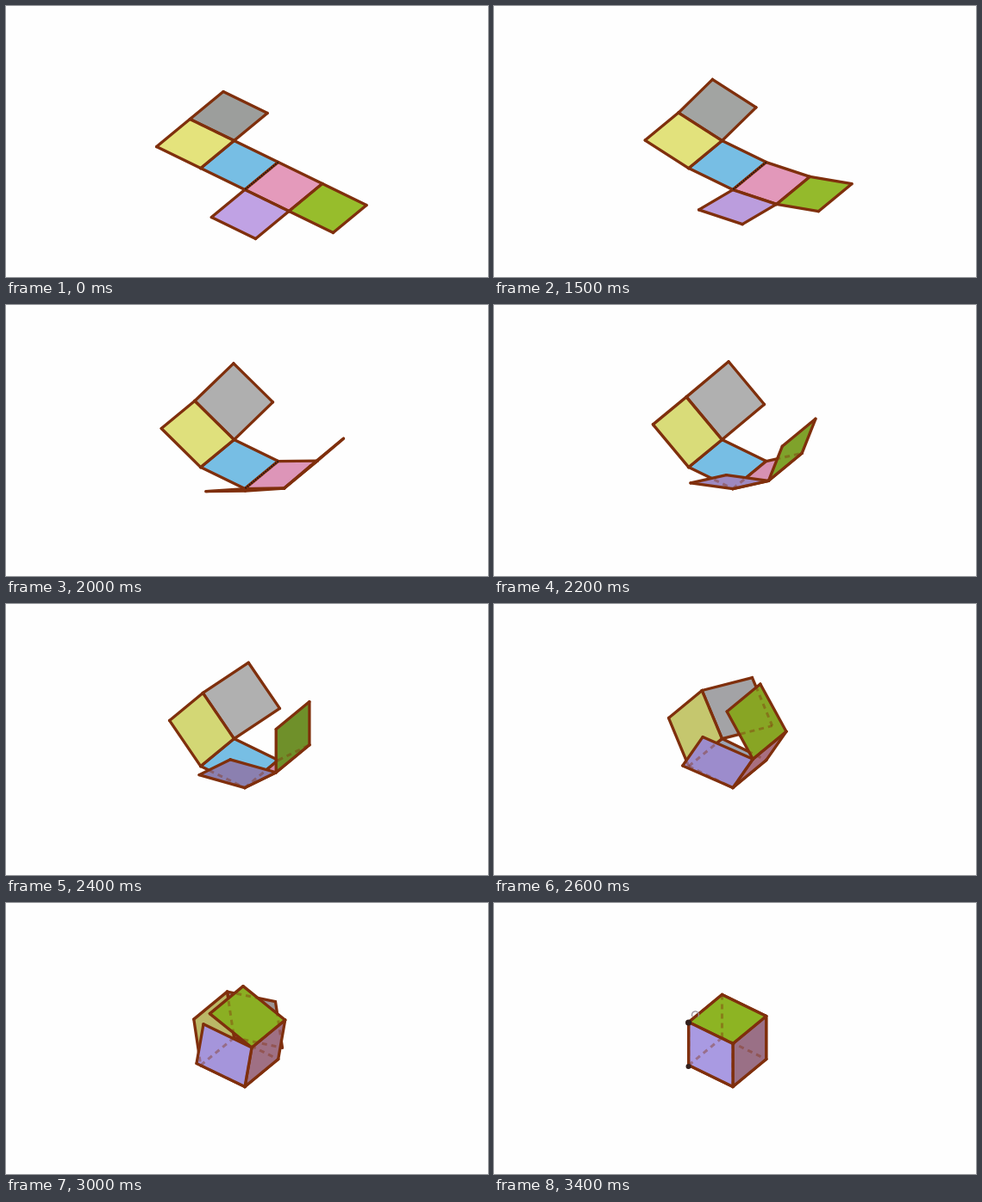
An HTML page with a canvas for the animation above (4900 ms loop, 559 by 315 pixels).

```html
<!DOCTYPE html>
<html lang="en">
<head>
<meta charset="utf-8">
<title>Folding a cube net</title>
<style>
  html, body { margin: 0; width: 100%; height: 100%; overflow: hidden; background: #fefefe; }
  canvas { display: block; }
</style>
</head>
<body>
<canvas id="stage" width="559" height="315"></canvas>
<script>
const ctx = document.getElementById('stage').getContext('2d');
const LOOP = 4900;
// Each step folds every hinge by another 9 degrees.
const STEP_TIMES = [0, 1500, 1700, 2000, 2200, 2400, 2500, 2600, 2800, 3000, 3400];
const LAST = STEP_TIMES.length - 1;
const BROWN = '#7f2f0c';

// Projected unit axes of the base square.
const ORIGIN = [264.5, 156.6];
const U = [51.2, 25], V = [-38.7, 32], Z = [0, -50.2];

// Face colours at the steps in SHADE_KEYS, following the changing light.
const SHADE_KEYS = [0, 3, 5, 7, 10];
const SHADES = {
  blue:   [0x77bee4, 0x77bee4, 0x77bee4, 0x9aa4b4, 0x9aa4b4],
  gray:   [0x9c9e9c, 0xafafaf, 0xb0b0b0, 0xa3a3a6, 0x988c8c],
  yellow: [0xe4e37c, 0xdfe07c, 0xd3d775, 0xc5c76e, 0xb6b064],
  pink:   [0xe49abb, 0xdd95b8, 0xd08cac, 0xa86f80, 0x9a7086],
  green:  [0x97bd2c, 0x8fb32c, 0x6f902a, 0x88a524, 0x8db423],
  purple: [0xc0a2e4, 0xb092d0, 0x8b80b0, 0x9c8ccc, 0xa99ae2]
};

const add = (a, b) => a.map((n, i) => n + b[i]);
const mix = (a, p, b, q) => a.map((n, i) => n * p + b[i] * q);
const quad = (p, a, b) => [p, add(p, a), add(add(p, a), b), add(p, b)];

function shade(name, step) {
  let i = 0;
  while (i < SHADE_KEYS.length - 2 && step >= SHADE_KEYS[i + 1]) i++;
  const t = (step - SHADE_KEYS[i]) / (SHADE_KEYS[i + 1] - SHADE_KEYS[i]);
  const [from, to] = [SHADES[name][i], SHADES[name][i + 1]];
  const rgb = [16, 8, 0].map(bit => {
    const a = from >> bit & 255, b = to >> bit & 255;
    return Math.round(a + (b - a) * t);
  });
  return `rgb(${rgb})`;
}

// Faces from back to front.
function foldNet(angle) {
  const c = Math.cos(angle), s = Math.sin(angle);
  const left = mix(U, -c, Z, s);
  const right = mix(U, c, Z, s);
  const lid = mix(U, Math.cos(2 * angle), Z, Math.sin(2 * angle));
  const back = mix(V, -c, mix(Z, c, U, s), s);
  const front = mix(V, c, mix(Z, c, U, -s), s);
  const hinge = add(ORIGIN, U);
  return {
    blue: quad(ORIGIN, U, V),
    gray: quad(ORIGIN, left, back),
    yellow: quad(ORIGIN, left, V),
    pink: quad(hinge, right, V),
    green: quad(add(hinge, right), lid, V),
    purple: quad(add(hinge, V), right, front)
  };
}

function trace(points, close) {
  ctx.beginPath();
  points.forEach(p => ctx.lineTo(p[0], p[1]));
  if (close) ctx.closePath();
}

function line(points, color, width, dash = []) {
  trace(points);
  ctx.strokeStyle = color;
  ctx.lineWidth = width;
  ctx.setLineDash(dash);
  ctx.stroke();
}

function dot(x, y, r) {
  ctx.beginPath();
  ctx.arc(x, y, r, 0, 2 * Math.PI);
  ctx.fill();
}

function drawFace(points, color, edges) {
  trace(points, true);
  ctx.fillStyle = color;
  ctx.fill();

  // Edges behind this face show through as dashes.
  ctx.save();
  ctx.clip();
  ctx.lineCap = 'butt';
  ctx.globalAlpha = 0.4;
  for (const edge of edges.values()) line(edge, BROWN, 3, [6, 5]);
  ctx.restore();

  points.forEach((p, i) => {
    const edge = [p, points[(i + 1) % 4]].sort((a, b) => a[0] - b[0] || a[1] - b[1]);
    edges.set(edge.flat().map(Math.round).join(), edge);
    line(edge, BROWN, 3.3);
  });
}

function draw(step) {
  ctx.fillStyle = '#fefefe';
  ctx.fillRect(0, 0, 559, 315);
  ctx.lineCap = ctx.lineJoin = 'round';

  const faces = foldNet(step * Math.PI / 20);
  const edges = new Map();
  for (const name in faces) drawFace(faces[name], shade(name, step), edges);

  if (step <= 3) {
    ctx.lineCap = 'butt';
    line([faces.blue[1], faces.blue[2]], '#111', 1.6, [1.5, 1.5]);
  }
  if (step === LAST) {
    ctx.fillStyle = '#33201c';
    dot(225.5, 139, 3.5);
    dot(225.5, 190, 3);
    ctx.beginPath();
    ctx.arc(233.5, 130, 4, 0.85 * Math.PI, 2.15 * Math.PI);
    ctx.strokeStyle = '#99909a';
    ctx.lineWidth = 1.3;
    ctx.setLineDash([]);
    ctx.stroke();
  }
}

let shown = -1;
const start = performance.now();

function tick() {
  const time = (performance.now() - start) % LOOP;
  let step = LAST;
  while (STEP_TIMES[step] > time) step--;
  if (step !== shown) draw(shown = step);
  requestAnimationFrame(tick);
}
tick();
</script>
</body>
</html>
```
